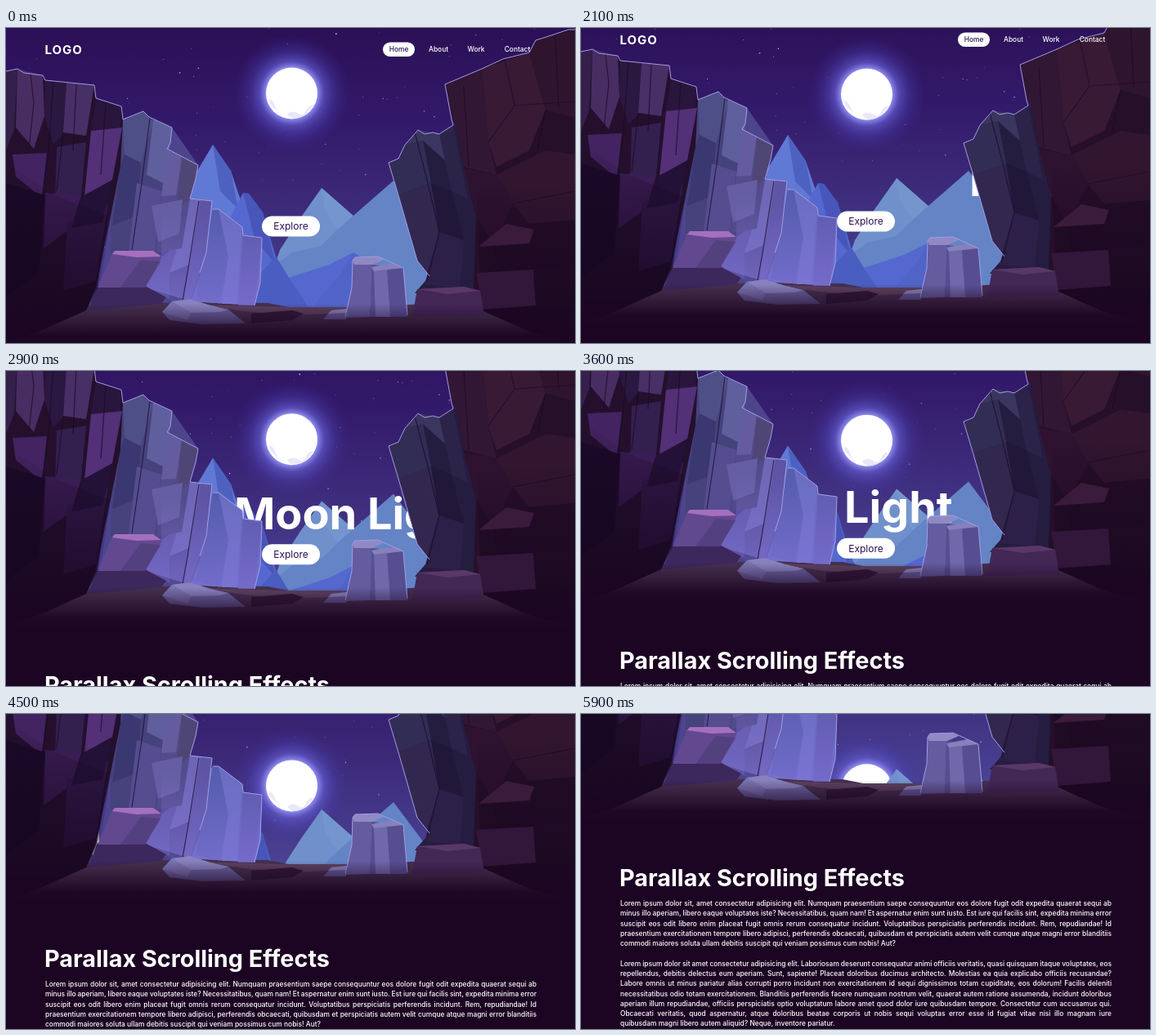
An HTML page for the animation above (6000 ms loop, 696 px wide and 386 px high).

```html
<!DOCTYPE html>
<html lang="en">
<head>
<meta charset="utf-8">
<title>Parallax scrolling</title>
<style>
  html, body { margin: 0; width: 100%; height: 100%; overflow: hidden; background: #1c0522; }
  svg { display: block; width: 696px; height: 386px; font-family: Inter, Roboto, sans-serif; fill: #fff; }
  .edge { fill: none; stroke: #a39de6; stroke-width: 1; stroke-linejoin: round; }
  .crack { fill: none; stroke: #1a0a26; stroke-width: 1.2; opacity: .7; }
  #nav { font-size: 8.4px; font-weight: 500; text-anchor: middle; }
  #lines { font-size: 8.4px; font-weight: 500; }
</style>
</head>
<body>
<svg viewBox="0 0 696 386">
  <defs>
    <linearGradient id="skyFill" x1="0" y1="0" x2="0" y2="1">
      <stop offset="0" stop-color="#2b1056"/>
      <stop offset=".3" stop-color="#33196a"/>
      <stop offset=".55" stop-color="#3c2a79"/>
      <stop offset="1" stop-color="#504c9e"/>
    </linearGradient>
    <radialGradient id="glow">
      <stop offset=".42" stop-color="#9a96f8"/>
      <stop offset=".55" stop-color="#6059cc" stop-opacity=".7"/>
      <stop offset=".75" stop-color="#4a3fb0" stop-opacity=".35"/>
      <stop offset="1" stop-color="#3c2a90" stop-opacity="0"/>
    </radialGradient>
    <linearGradient id="fade" x1="0" y1="0" x2="0" y2="1">
      <stop offset="0" stop-color="#1c0522" stop-opacity="0"/>
      <stop offset=".3" stop-color="#1c0522" stop-opacity=".35"/>
      <stop offset=".75" stop-color="#1c0522" stop-opacity=".92"/>
      <stop offset="1" stop-color="#1c0522"/>
    </linearGradient>
    <linearGradient id="dark" x1="0" y1="0" x2="0" y2="1">
      <stop offset="0" stop-color="#16051e" stop-opacity="0"/>
      <stop offset=".8" stop-color="#16051e" stop-opacity=".7"/>
    </linearGradient>
    <linearGradient id="haze" x1="0" y1="0" x2="0" y2="1">
      <stop offset=".2" stop-color="#8578dc" stop-opacity="0"/>
      <stop offset="1" stop-color="#8578dc" stop-opacity=".6"/>
    </linearGradient>
  </defs>

  <g id="sky"><rect width="696" height="390" fill="url(#skyFill)"/></g>
  <g id="stars"></g>

  <g id="moon">
    <circle cx="349.5" cy="80" r="72" fill="url(#glow)"/>
    <circle cx="349.5" cy="80" r="31.5"/>
    <g fill="#e9e8f8">
      <path d="M321 87q6 1 8 8t7 8q-12-4-15-16z"/>
      <path d="M344 105q8-5 14 0t10-6q4-6 8-4-9 14-22 16-7 0-10-6z"/>
    </g>
  </g>

  <g id="behind">
    <path fill="#7090cb" d="M386 196 427 232 460 270 480 345H310L335 272 360 233z"/>
    <path fill="#7595ce" d="M386 196 427 232 406 247 391 226z"/>
    <path fill="#6484c6" d="M474 187 410 243 385 267 350 275 330 290V345H560L510 235z"/>
    <path fill="#6079d4" d="M253 143 275 175 285 205 300 240V345H200L228 185z"/>
    <path fill="#4d61c0" d="M253 143 275 175 284 222 262 200z"/>
    <path fill="#5468cf" d="M290 202 297 203 314 226 330 280 346 306 395 290 425 275 440 285V345H225L270 240z"/>
    <path fill="#4856bb" d="M290 202 297 203 314 226 330 290 304 258z"/>
    <path fill="#4a5dc0" d="M330 280 346 306 372 345H300L312 300z"/>
    <path fill="#5064c8" d="M425 275 440 285V345H372L410 300z"/>
  </g>

  <text id="hero" x="571" y="212" font-size="54" font-weight="700">Moon Light</text>
  <g id="button">
    <rect x="313" y="230.500" width="71" height="25" rx="12.500"/>
    <text x="348.500" y="247.300" font-size="12" text-anchor="middle" fill="#2b1055">Explore</text>
  </g>

  <g id="front">
    <!-- ground -->
    <path fill="#45304f" d="M0 345 200 335 320 337 345 342 420 344 510 338 696 345V390H0z"/>
    <path fill="#5c425f" d="M240 339 345 342 440 342 420 349 350 352 290 347z"/>
    <path fill="#301838" d="M300 350 350 346 364 350 350 358 300 362z"/>

    <!-- left, inner cliffs -->
    <path fill="#4d458c" d="M143 112 203 122 235 168 225 209 252 212 245 275 230 336 150 338 115 318 128 230z"/>
    <path fill="#6065b8" d="M253 222H260L289 244 290 254 313 257 311 312 304 340 226 335 242 290z"/>
    <path fill="#565cae" d="M253 222H260L272 280 262 338 232 330z"/>
    <path fill="#6a6dc2" d="M260 222 289 244 282 338H264L272 280z"/>
    <path fill="#5c58ac" d="M290 254 313 257 304 340H284z"/>
    <path fill="#5d54a4" d="M225 209 252 212 245 275 237 300 226 332 205 335 170 318 190 281 215 260z"/>
    <path fill="#6e67b6" d="M225 209 238 211 224 290 200 300 214 255z"/>
    <path fill="#524a92" d="M200 300 224 290 218 334H200z"/>
    <path fill="#534b8c" d="M197 148 235 168 232 185 225 209 215 270 185 275 188 205z"/>
    <path fill="#655c9f" d="M197 148 215 158 208 205 188 206z"/>
    <path fill="#504676" d="M215 158 235 168 225 209 208 225z"/>
    <path fill="#45427c" d="M143 112 168 102 175 109 203 122 201 141 197 148 190 205 182 276H128V230L140 170z"/>
    <path fill="#4f4f88" d="M143 112 168 102 180 115 165 165 145 155z"/>
    <path fill="#605f9e" d="M180 112 203 122 201 141 192 190 172 180z"/>
    <path fill="#3b3770" d="M145 155 165 165 160 230 130 242 140 170z"/>
    <path fill="#554d90" d="M160 190 190 200 182 274H150z"/>
    <path fill="#665ea4" d="M178 218 216 210 212 252 186 262z"/>
    <path fill="url(#haze)" d="M190 200 225 209 252 212 247 250 253 222 260 222 289 244 290 254 313 257 311 312 304 340 226 335 170 318 190 281z"/>
    <path fill="#3c285c" d="M112 316H170L196 330 190 338 100 346z"/>
    <path fill="#62498f" d="M131 274H180L190 281 188 287 170 318H112z"/>
    <path fill="#53407f" d="M165 284 189 286 170 318H140z"/>
    <path fill="#a56fbe" d="M133 273H180L190 280 160 281 130 277z"/>

    <!-- left, outer cliff -->
    <path fill="#24102d" d="M0 53 14 50 22 55 45 58 48 64 108 70 110 86 141 96 143 112 140 170 128 230 110 318 98 346 40 372 0 386z"/>
    <path fill="#35204c" d="M0 53 14 50 10 125 0 150z"/>
    <path fill="#482d63" d="M14 50 45 58 47 108 34 148 12 122z"/>
    <path fill="#2b1840" d="M48 64 74 67 70 130 58 142 47 108z"/>
    <path fill="#482f66" d="M74 67 108 70 98 132 70 128z"/>
    <path fill="#2a163c" d="M110 86 141 96 140 122 104 126z"/>
    <path fill="#533077" d="M104 126 142 122 130 186 96 205z"/>
    <path fill="#432361" d="M8 155 50 153 44 208 12 182z"/>
    <path fill="#33204f" d="M62 146 98 140 92 205 60 214z"/>
    <path fill="#3a1d54" d="M48 202 92 205 80 245 46 270z"/>
    <path fill="#1b0a28" d="M0 190 48 205 40 300 0 330z"/>
    <path fill="#311a4a" d="M75 238 125 215 110 310 70 322z"/>
    <path fill="#241138" d="M95 205 130 188 118 238 80 245z"/>
    <path class="crack" d="M30 56 34 92 28 148M58 66 52 150 44 210M86 69 82 150M122 92 116 180M176 110 166 190 154 272M236 212 222 300 216 334M70 128 62 200"/>

    <!-- right, inner cliff -->
    <path fill="#251d40" d="M468 165 480 160 488 143 504 125 512 130 522 128 530 130 547 119 560 125 575 230V325H500L518 304 503 285 480 205z"/>
    <path fill="#322d54" d="M468 165 480 160 488 143 510 138 520 190 480 204z"/>
    <path fill="#3b3660" d="M488 143 504 125 530 130 540 165 510 138z"/>
    <path fill="#32284f" d="M480 204 520 190 530 250 515 300 503 285z"/>
    <path fill="#2b2448" d="M530 130 547 119 565 210 545 200z"/>
    <path fill="#211739" d="M520 190 545 200 560 260 530 250z"/>
    <path fill="#2c2048" d="M530 250 560 260 555 318 512 314z"/>

    <!-- right, outer cliff -->
    <path fill="#260f28" d="M696 2H688L664 10 648 15 640 30 608 38 582 50 537 69 545 112 551 120 560 170 575 230 572 320 582 346 640 372 696 386z"/>
    <path fill="#311734" d="M537 69 582 50 590 140 600 180 560 170 551 120 545 112z"/>
    <path fill="#381a35" d="M582 50 640 30 660 100 640 150 600 170 590 140z"/>
    <path fill="#2f142e" d="M640 30 648 15 696 2V110L660 100z"/>
    <path fill="#2e1230" d="M560 172 600 180 620 215 596 265 575 230z"/>
    <path fill="#32152f" d="M600 180 660 150 696 155V235L640 240 620 215z"/>
    <path fill="#240d27" d="M596 265 640 240 696 235V290L600 300z"/>
    <path class="crack" d="M610 38 622 95 590 140M622 95 696 90M660 100 650 150M620 215 696 200M560 72 566 170M500 128 516 190 530 250 515 310M672 10 676 96"/>
    <path fill="url(#dark)" d="M575 190H696V386L640 372 582 346z"/>
    <path fill="#3a1b3b" d="M578 268 612 240 646 247 640 264z"/>
    <path fill="#32173a" d="M575 300 645 296 648 340 583 345z"/>
    <path fill="#432856" d="M503 320 560 317 580 322 585 352 497 354z"/>
    <path fill="#5a3866" d="M503 320 560 317 580 322 540 326z"/>

    <!-- boulders -->
    <path fill="#655c99" d="M388 357 398 346 418 344 416 357z"/>
    <path fill="#8b84bd" d="M398 346 418 344 417 349 394 350z"/>
    <path fill="#645c9f" d="M424 285 447 290 445 354 415 355 423 318z"/>
    <path fill="#574e92" d="M447 290 486 294 491 354H445z"/>
    <path fill="#7068ab" d="M450 298 466 296 470 354H452z"/>
    <path fill="#8f8ac4" d="M424 285 427 281 455 280 462 284 448 290 426 290z"/>
    <path fill="#8680bb" d="M447 293 473 288 486 294 450 298z"/>
    <path fill="#6a62a0" d="M191 348 203 335 225 332 250 340 272 345 293 362 240 363 200 358z"/>
    <path fill="#8782bd" d="M203 335 225 332 250 340 272 345 262 348 226 349z"/>
    <path fill="#7a73b0" d="M191 348 203 335 226 349 222 358z"/>

    <path class="edge" d="M0 53 14 50 22 55 45 58 48 64 108 70 110 86 141 96 143 112 168 102 175 109 203 122 201 141 197 148 235 168 232 185 225 209 252 212 245 275 237 300M253 222H260L289 244 290 254 313 257 311 312 304 340"/>
    <path class="edge" d="M518 304 503 285 480 205 468 165 480 160 488 143 504 125 512 130 522 128 530 130 547 119 545 112 537 69 582 50 608 38 640 30 648 15 664 10 688 2H696"/>
    <path class="edge" d="M415 354 423 318 424 285 427 281 455 280 473 288 486 294 491 352"/>
    <path fill="url(#dark)" d="M0 165 60 205 125 230 112 318 98 346 40 372 0 386z"/>
    <rect y="338" width="696" height="50" fill="url(#fade)"/>
  </g>

  <g id="page">
    <rect y="386" width="696" height="700" fill="#1c0522"/>
    <text x="47" y="468" font-size="28.800" font-weight="700">Parallax Scrolling Effects</text>
    <g id="lines"></g>
  </g>

  <g id="header">
    <text x="47.500" y="32" font-size="15" font-weight="700" letter-spacing="1">LOGO</text>
    <g id="nav">
      <rect x="461" y="17.500" width="39" height="17.500" rx="8.750"/>
      <text x="480.500" y="29.300" fill="#2b1055">Home</text>
      <text x="529" y="29.300">About</text>
      <text x="575" y="29.300">Work</text>
      <text x="625.500" y="29.300">Contact</text>
    </g>
  </g>
</svg>

<script>
const LOOP = 6000, STEP = 100;
const copy = `Lorem ipsum dolor sit, amet consectetur adipisicing elit. Numquam praesentium saepe consequuntur eos dolore fugit odit expedita quaerat sequi ab
minus illo aperiam, libero eaque voluptates iste? Necessitatibus, quam nam! Et aspernatur enim sunt iusto. Est iure qui facilis sint, expedita minima error
suscipit eos odit libero enim placeat fugit omnis rerum consequatur incidunt. Voluptatibus perspiciatis perferendis incidunt. Rem, repudiandae! Id
praesentium exercitationem tempore libero adipisci, perferendis obcaecati, quibusdam et perspiciatis autem velit cumque atque magni error blanditiis
commodi maiores soluta ullam debitis suscipit qui veniam possimus cum nobis! Aut?

Lorem ipsum dolor sit amet consectetur adipisicing elit. Laboriosam deserunt consequatur animi officiis veritatis, quasi quisquam itaque voluptates, eos
repellendus, debitis delectus eum aperiam. Sunt, sapiente! Placeat doloribus ducimus architecto. Molestias ea quia explicabo officiis recusandae?
Labore omnis ut minus pariatur alias corrupti porro incidunt non exercitationem id sequi dignissimos totam cupiditate, eos dolorum! Facilis deleniti
necessitatibus odio totam exercitationem. Blanditiis perferendis facere numquam nostrum velit, quaerat autem ratione assumenda, incidunt doloribus
aperiam illum repudiandae, officiis perspiciatis optio voluptatum labore amet quod dolor iure quibusdam tempore. Consectetur cum accusamus qui.
Obcaecati veritatis, quod aspernatur, atque doloribus beatae corporis ut nobis sequi voluptas error esse id fugiat vitae nisi illo magnam iure
quibusdam magni libero autem aliquid? Neque, inventore pariatur.`.split('\n');

const $ = id => document.getElementById(id);
const add = (parent, tag, attrs) => {
  const el = document.createElementNS('http://www.w3.org/2000/svg', tag);
  for (const k in attrs) el.setAttribute(k, attrs[k]);
  return parent.appendChild(el);
};

// Justify every line except the last of each paragraph
copy.forEach((line, i) => {
  const el = add($('lines'), 'text', { x: 48, y: 492 + i * 12.27 });
  el.textContent = line;
  if (copy[i + 1])
    el.setAttribute('word-spacing', (601 - el.getComputedTextLength()) / (line.split(' ').length - 1));
});

let seed = 11;
const random = () => (seed = seed * 16807 % 2147483647) / 2147483647;
for (let i = 0; i < 150; i++)
  add($('stars'), 'circle', {
    cx: random() * 760 - 64, cy: random() * 300, r: .4 + random() ** 3 * .6,
    fill: '#d8d0ff', opacity: .4 + random() * .6
  });

// Scroll offset over time: [ms, px]
const scrollKeys = [[0, 0], [1100, 0], [1600, 9], [2100, 24], [2900, 73], [3600, 103], [4500, 158], [5100, 200], [6000, 264]];
function scrollAt(t) {
  const i = scrollKeys.findIndex(k => k[0] > t);
  const [t0, s0] = scrollKeys[i - 1], [t1, s1] = scrollKeys[i];
  return s0 + (s1 - s0) * (t - t0) / (t1 - t0);
}

const move = (id, x, y) => $(id).setAttribute('transform', `translate(${x} ${y})`);
function draw(now) {
  const s = scrollAt(Math.floor(now % LOOP / STEP) * STEP);
  move('sky', 0, -s);
  move('stars', s * .25, -s);
  move('moon', 0, s * .05);
  move('behind', 0, -s * .5);
  move('hero', -s * 4, -s * .25);
  move('button', 0, -s * .25);
  move('front', 0, -s);
  move('page', 0, -s);
  move('header', 0, -s * .5);
  requestAnimationFrame(() => draw(performance.now() - start));
}
const start = performance.now();
draw(0);
</script>
</body>
</html>
```
